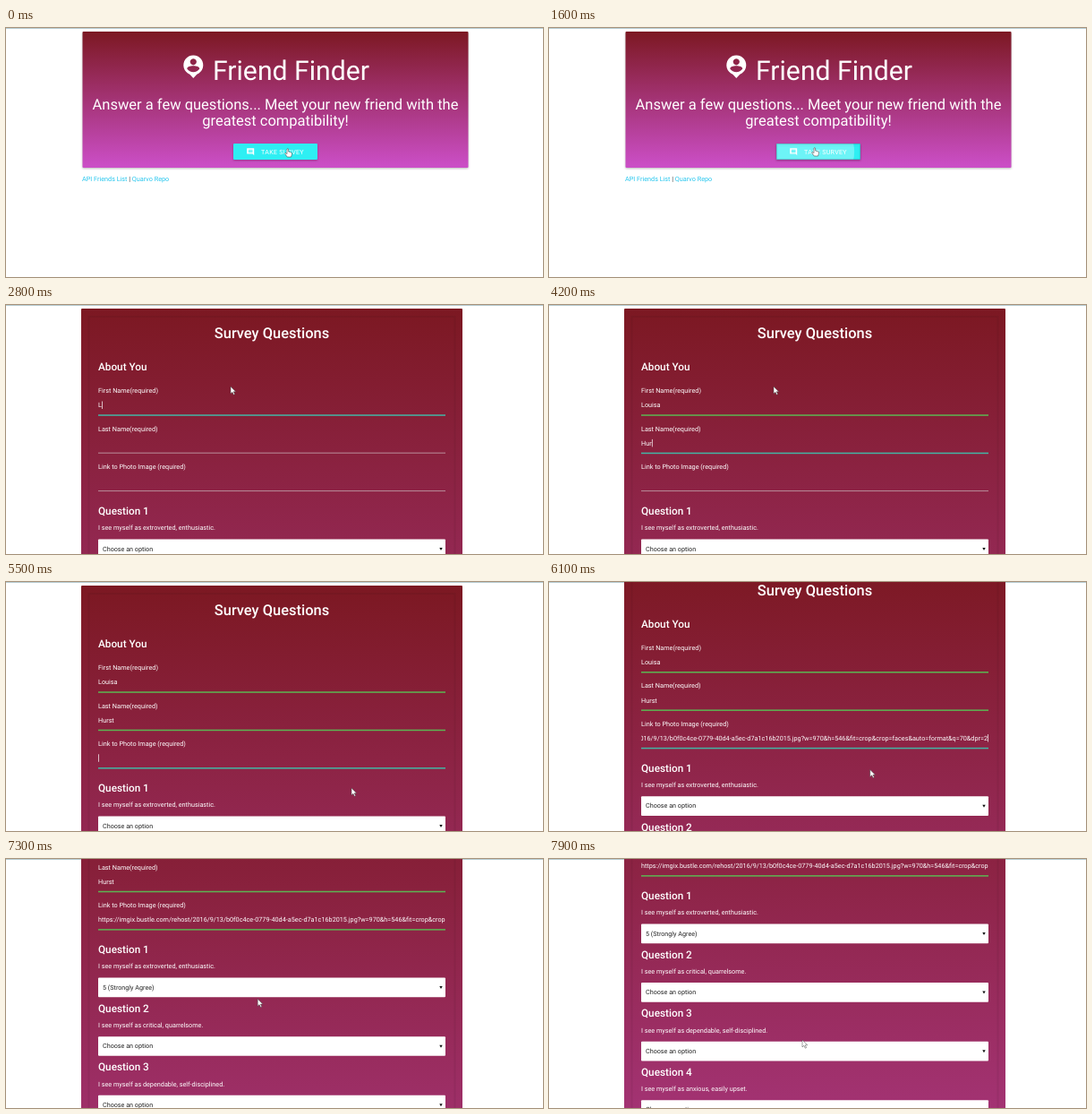
Write an HTML page that moves like this. It is 600 px wide and 278 px high and loops after 8 s.

```html
<!DOCTYPE html>
<html lang="en">
<head>
<meta charset="utf-8">
<title>Friend survey</title>
<style>
  html, body { margin: 0; width: 100%; height: 100%; overflow: hidden; background: #fff; }
  svg { display: block; width: 600px; height: 278px; }
  text { font: 7.25px Roboto, sans-serif; fill: #fff; white-space: pre; text-rendering: geometricPrecision; }
  .title { font-size: 30.2px; }
  .lead { font-size: 16.5px; text-anchor: middle; }
  .head { font-size: 16.45px; font-weight: 500; text-anchor: middle; }
  .sub { font-size: 11.75px; font-weight: 500; }
  .button { font-size: 7.1px; letter-spacing: .28px; }
  .links { fill: #333; }
  .links tspan { fill: #26c6ee; }
  .option { font-size: 7.2px; fill: #222; }
  #home > rect { filter: drop-shadow(0 1px 1px #0004); }
</style>
</head>
<body>
<svg viewBox="0 0 600 278">
  <defs>
    <linearGradient id="wine" x2="0" y2="1">
      <stop stop-color="#7c1822"/><stop offset="1" stop-color="#cc4fc8"/>
    </linearGradient>
    <clipPath id="buttonClip"><rect x="254" y="129" width="94" height="18" rx="1"/></clipPath>
    <clipPath id="fieldClip"><rect x="103" y="188" width="388" height="16"/></clipPath>
  </defs>
  <rect width="600" height="1" fill="#b8ccd3"/>

  <g id="home">
    <rect x="85.5" y="4" width="431" height="152" rx="1" fill="url(#wine)"/>
    <path fill="#fff" fill-rule="evenodd" d="M209.3 56 l-4-4.3 a11 11 0 1 1 8 0z
      M209.3 34.2 a3.6 3.6 0 1 0 .01 0z M202.3 45.6 a8.4 8.4 0 0 0 14 0 c-.1-4.4-13.9-4.4-14 0z"/>
    <text class="title" x="231" y="58">Friend Finder</text>
    <text class="lead" x="301" y="91">Answer a few questions... Meet your new friend with the</text>
    <text class="lead" x="301" y="109">greatest compatibility!</text>
    <rect x="254" y="129" width="94" height="18" rx="1" fill="#2eeff3"/>
    <g clip-path="url(#buttonClip)"><circle id="ripple" cx="297" cy="138" fill="#fff" opacity=".3"/></g>
    <rect id="ring" x="254.5" y="129.5" width="93" height="17" fill="none" stroke="#3a6a80" stroke-width=".6" stroke-dasharray="1 1"/>
    <path fill="#fff" d="M269.2 134.2h8v8l-1.6-1.6h-6.4z"/>
    <path stroke="#2eeff3" stroke-width=".8" d="M270.8 136.2h4.8m-4.8 1.3h4.8m-4.8 1.3h4.8"/>
    <text class="button" x="285" y="140.5">TAKE SURVEY</text>
    <text class="links" x="85" y="171.2"><tspan>API Friends List</tspan> | <tspan>Quarvo Repo</tspan></text>
  </g>

  <g id="form">
    <rect x="84" y="4" width="426" height="950" rx="1" fill="url(#wine)"/>
    <rect x="92.5" y="13" width="409" height="930" fill="none" stroke="#000" stroke-width="2" opacity=".06"/>
    <text class="head" x="297" y="37">Survey Questions</text>
    <text class="sub" x="103" y="73">About You</text>
  </g>

  <path id="arrow" fill="#fff" stroke="#444" stroke-width=".5" d="M0 0v8l1.9-1.7 1.4 2.9 1.3-.6-1.4-2.8h2.5z"/>
  <path id="hand" fill="#fff" stroke="#333" stroke-width=".5" d="M-1-4q1-1 1.6 0v3l3.2 1q1 .5.7 2l-1 3h-4.2l-2.6-3.6q0-1.4 1.3-.6l1 .8z"/>
</svg>
<script>
const $ = id => document.getElementById(id);
const form = $('form');
const LOOP = 8000, SURVEY = 1700, PASTE = 5900, BLUR = 7000;
const FOCUSED = '#43b5a5', VALID = '#5cb552', IDLE = '#b98d9b';
const url = 'https://imgix.bustle.com/rehost/2016/9/13/b0f0c4ce-0779-40d4-a5ec-d7a1c16b2015.jpg' +
  '?w=970&h=546&fit=crop&crop=faces&auto=format&q=70&dpr=2';

function add(parent, tag, attrs, text = '') {
  const el = document.createElementNS('http://www.w3.org/2000/svg', tag);
  for (const key in attrs) el.setAttribute(key, attrs[key]);
  el.textContent = text;
  return parent.appendChild(el);
}

// focus and blur bound the time a field is active; typing starts at start
const fields = [
  { label: 'First Name(required)', value: 'Louisa', focus: 2400, start: 2800, pace: 130, blur: 3700 },
  { label: 'Last Name(required)', value: 'Hurst', focus: 3700, start: 3950, pace: 125, blur: 4900 },
  { label: 'Link to Photo Image (required)', value: url, focus: 4900, start: PASTE, pace: 0, blur: BLUR }
];
fields.forEach((f, i) => {
  const y = 42.4 * i;
  add(form, 'text', { x: 103, y: 98.3 + y }, f.label);
  const box = add(form, 'g', i == 2 ? { 'clip-path': 'url(#fieldClip)' } : {});
  f.text = add(box, 'text', { x: 103, y: 114.4 + y });
  f.caret = add(form, 'rect', { y: 107.5 + y, width: .7, height: 8.5, fill: '#fff' });
  f.line = add(form, 'rect', { x: 103, y: 122.3 + y, width: 388 });
});

const options = ['extroverted, enthusiastic', 'critical, quarrelsome',
  'dependable, self-disciplined', 'anxious, easily upset'].map((trait, i) => {
  const y = 230 + 65.6 * i;
  add(form, 'text', { x: 103, y: y + 4.2, class: 'sub' }, `Question ${i + 1}`);
  add(form, 'text', { x: 103, y: y + 21.4 }, `I see myself as ${trait}.`);
  add(form, 'rect', { x: 103, y: y + 31.5, width: 388, height: 21.7, rx: 1, fill: '#fff' });
  add(form, 'path', { d: `M484.3 ${y + 41}h3.4l-1.7 3z`, fill: '#111' });
  return add(form, 'text', { x: 108, y: y + 44.6, class: 'option' }, 'Choose an option');
});

// Eased value from keys of [time, ...values]
function along(keys, t) {
  const next = keys.findIndex(k => k[0] > t);
  if (next < 0) return keys.at(-1).slice(1);
  if (!next) return keys[0].slice(1);
  const a = keys[next - 1], b = keys[next];
  const u = (t - a[0]) / (b[0] - a[0]), e = u * u * (3 - 2 * u);
  return a.slice(1).map((v, i) => v + (b[i + 1] - v) * e);
}

const pointer = [[0, 315, 139], [500, 315, 139], [1300, 297, 138], [1800, 297, 138],
  [2400, 251, 91], [4700, 251, 91], [5400, 386, 230], [5900, 386, 230],
  [6500, 281, 151], [7200, 281, 151], [7700, 283, 202]];
const scroll = [[5950, 0], [6500, 122], [7200, 122], [7700, 189]];

const show = (el, on) => el.setAttribute('visibility', on ? 'visible' : 'hidden');

function drawField(f, t) {
  const active = t >= f.focus && t < f.blur;
  const count = t < f.start ? 0 : f.pace ? Math.floor((t - f.start) / f.pace) + 1 : f.value.length;
  const done = t >= f.blur;
  const toEnd = f.value == url && count && active;
  f.text.textContent = f.value.slice(0, count);
  f.text.setAttribute('x', toEnd ? 490 : 103);
  f.text.setAttribute('text-anchor', toEnd ? 'end' : 'start');
  f.caret.setAttribute('x', toEnd ? 490.2 : 103.3 + (count ? f.text.getComputedTextLength() : 0));
  f.caret.setAttribute('fill-opacity', +active);
  f.line.setAttribute('fill', active ? FOCUSED : done ? VALID : IDLE);
  f.line.setAttribute('height', active || done ? 1.5 : 1);
}

function draw(now) {
  const t = Math.floor(now % LOOP / 100) * 100;
  const onForm = t >= SURVEY;
  $('home').style.display = onForm ? 'none' : '';
  form.style.display = onForm ? '' : 'none';
  $('ripple').setAttribute('r', Math.max(0, t - 1300) * .147);
  show($('ring'), t >= 1400 && !onForm);
  if (onForm) fields.forEach(f => drawField(f, t));
  options[0].textContent = t < 7100 ? 'Choose an option' : '5 (Strongly Agree)';
  form.setAttribute('transform', `translate(0 ${-along(scroll, t)[0]})`);
  const place = `translate(${along(pointer, t).join(' ')})`;
  for (const id of ['arrow', 'hand']) $(id).setAttribute('transform', place);
  show($('arrow'), onForm);
  show($('hand'), !onForm);
  requestAnimationFrame(draw);
}
requestAnimationFrame(draw);
</script>
</body>
</html>
```
